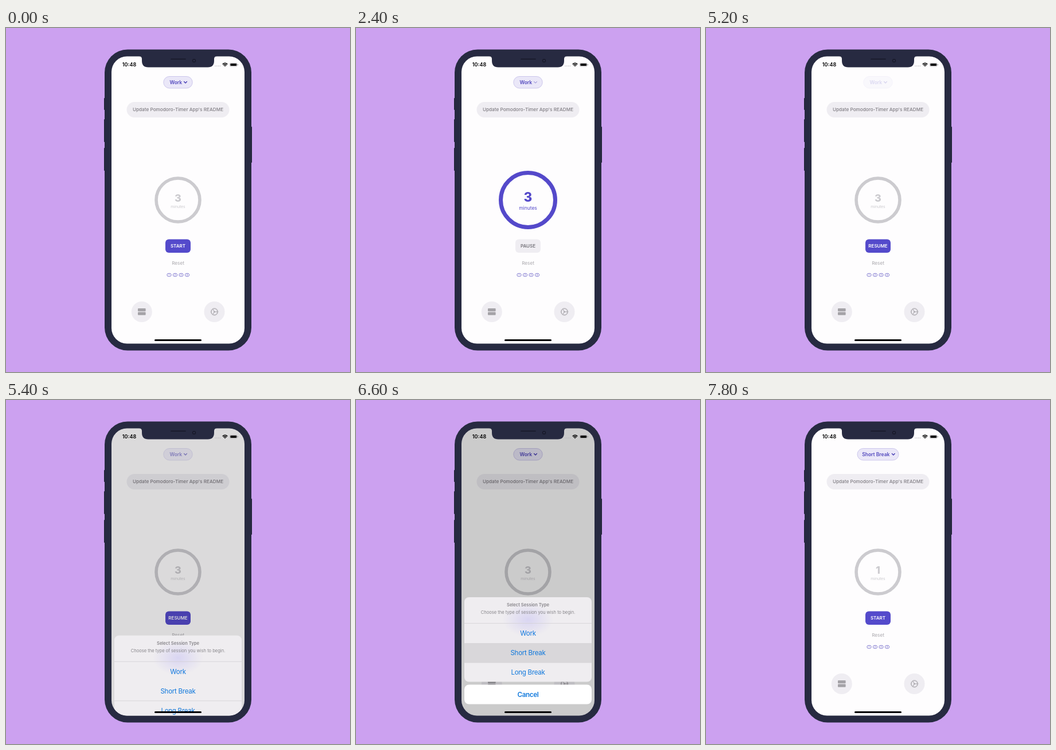
An HTML page that plays this animation: 600 px wide and 600 px high, repeating every 8 s.

```html
<!DOCTYPE html>
<html lang="en">
<head>
<meta charset="utf-8">
<title>Timer app</title>
<style>
  html, body { margin: 0; width: 100%; height: 100%; overflow: hidden; background: #cca1f0; }
  svg { display: block; width: 600px; height: 600px; font-family: Inter, sans-serif; text-anchor: middle; }
  .semi { font-weight: 600; }
  .actions text { font-size: 11.5px; letter-spacing: -.25px; fill: #0f78dc; }
</style>
</head>
<body>
<svg viewBox="0 0 600 600">
  <defs>
    <clipPath id="screen"><rect x="184" y="49.5" width="232" height="501" rx="27"/></clipPath>
    <radialGradient id="glow">
      <stop offset="0" stop-color="#d9d5f2"/>
      <stop offset="1" stop-color="#d9d5f2" stop-opacity="0"/>
    </radialGradient>
  </defs>

  <g fill="#1e2034">
    <rect x="171" y="122" width="4" height="21" rx="1"/>
    <rect x="171" y="159" width="4" height="40" rx="1"/>
    <rect x="171" y="209" width="4" height="40" rx="1"/>
    <rect x="425" y="172" width="4" height="63" rx="1"/>
  </g>
  <rect x="172" y="37.5" width="256" height="525" rx="40" fill="#272a41"/>

  <g clip-path="url(#screen)">
    <rect x="184" y="49" width="232" height="502" fill="#fefdfe"/>

    <g id="pill">
      <rect id="pillBox" y="84.5" height="20.5" rx="10.25" fill="#eae7f8" stroke="#c2bce8" stroke-width=".8"/>
      <text id="pillText" y="97.8" font-size="8.5" class="semi" fill="#5248be"></text>
      <path id="chevron" d="M-2.4-1.2 0 1.2 2.4-1.2" fill="none" stroke="#463cb4" stroke-width="1.4"
        stroke-linecap="round" stroke-linejoin="round"/>
    </g>

    <rect x="210.5" y="129" width="179" height="27" rx="13.5" fill="#efedf2"/>
    <text x="300" y="145.4" font-size="8.2" font-weight="500" fill="#807e84">Update Pomodoro-Timer App's README</text>

    <g id="dial" fill="currentColor">
      <circle r="47.5" fill="none" stroke="currentColor" stroke-width="7"/>
      <text id="minutes" y="3.3" font-size="22.5" font-weight="800"></text>
      <text y="17.3" font-size="8.5">minutes</text>
    </g>

    <g id="button">
      <rect id="buttonBox" x="278" y="368.5" width="44" height="23.5" rx="6"/>
      <text id="buttonText" x="300" y="383.2" font-size="8" class="semi"></text>
    </g>
    <text x="300" y="413.2" font-size="8.2" fill="#aaa8ad">Reset</text>
    <g id="rounds" fill="#6d63c8" stroke="#7269ca"></g>

    <g fill="#efedf2"><circle cx="236.8" cy="495" r="18"/><circle cx="363.5" cy="495" r="18"/></g>
    <g fill="#a4a2a7">
      <rect x="230" y="489" width="13.6" height="5.3" rx="1"/>
      <rect x="230" y="495.5" width="13.6" height="5.3" rx="1"/>
    </g>
    <g transform="translate(363.5 495)" fill="none" stroke="#a4a2a7">
      <circle r="5.4"/>
      <circle r="6.3" stroke-dasharray="1.2 1.28"/>
      <path d="M5.2 0H0L-2.6-4.5M0 0-2.6 4.5"/>
      <circle r="1.2" fill="#a4a2a7" stroke="none"/>
    </g>

    <rect id="dim" x="184" y="49" width="232" height="502"/>

    <g id="sheet">
      <rect x="189" y="344" width="222" height="147.5" rx="8" fill="#efedf0"/>
      <ellipse cx="300" cy="383" rx="44" ry="30" fill="url(#glow)"/>
      <rect id="highlight" x="189" y="424" width="222" height="34" fill="#d9d7da"/>
      <path d="M189 389.5H411M189 458H411" stroke="#d3d1d5" stroke-width=".8"/>
      <g fill="#87858a">
        <text x="300" y="360" font-size="7.6" class="semi">Select Session Type</text>
        <text x="300" y="373" font-size="7.55">Choose the type of session you wish to begin.</text>
      </g>
      <rect x="189" y="496.5" width="222" height="34" rx="8" fill="#fff"/>
      <g class="actions">
        <text x="300" y="411.2">Work</text>
        <text x="300" y="445.2">Short Break</text>
        <text x="300" y="479.2">Long Break</text>
        <text x="300" y="517.7" class="semi">Cancel</text>
      </g>
    </g>

    <text x="215" y="67.3" font-size="9" class="semi">10:48</text>
    <path d="M365 66.2H374" stroke="#b5b3b7" stroke-width="1.5" stroke-linecap="round" stroke-dasharray="0 2.8"/>
    <g fill="none" stroke="#000" stroke-width="1.4">
      <path d="M377.6 63.2Q382 59.2 386.4 63.2M379.2 65Q382 62.5 384.8 65"/>
      <path d="M380.6 65.8 382 67.5 383.4 65.8Q382 64.8 380.6 65.8" fill="#000" stroke="none"/>
    </g>
    <rect x="390.5" y="61" width="12.6" height="6" rx="1.8" fill="none" stroke="#a5a3a7" stroke-width=".7"/>
    <rect x="391.4" y="61.9" width="10.8" height="4.2" rx="1"/>
    <path d="M404.2 63V65.2" stroke="#8a888c"/>
    <rect x="259" y="543" width="82" height="3" rx="1.5"/>
  </g>

  <path d="M232 49Q237 49.5 237 54V57Q237 68.5 248 68.5H352Q363 68.5 363 57V54Q363 49.5 368 49Z" fill="#272a41"/>
  <path d="M288 54.3H313" stroke="#171929" stroke-width="1.6" stroke-linecap="round"/>
  <circle cx="328" cy="57" r="3.2" fill="#1a1c2d"/>
  <circle cx="328" cy="57" r="1.3" fill="#30334f"/>
</svg>
<script>
const LOOP = 8000;
const START = 1250, PAUSE = 3250, OPEN = 5305, DISMISS = 6680, PICKED = 7120;
const $ = id => document.getElementById(id);
const set = (id, attrs) => {
  for (const name in attrs) $(id).setAttribute(name, attrs[name]);
};
const clamp = x => Math.min(1, Math.max(0, x));
const ease = x => x < .5 ? 2 * x * x : 1 - 2 * (1 - x) ** 2;
const mix = (a, b, k) => `rgb(${a.map((v, i) => v + (b[i] - v) * k)})`;

// Critically damped spring from 0 to 1; rate is per second.
function spring(t, start, rate) {
  const x = Math.max(0, t - start) / 1000 * rate;
  return 1 - (1 + x) * Math.exp(-x);
}

// Opacity of a control that fades while held and recovers on release.
const touch = (t, down, up) =>
  1 - .8 * ease(clamp((t - down) / 150)) * (1 - ease(clamp((t - up) / 250)));

$('rounds').innerHTML = [1, 2, 3, 4].map((n, i) => {
  const x = 284.5 + i * 10.5;
  return `<ellipse cx="${x}" cy="430.7" rx="3.7" ry="2.7" fill="none" stroke-width=".9"/>
    <text x="${x}" y="432.1" font-size="3.8" stroke="none">${n}</text>`;
}).join('');

function draw(t) {
  const running = t >= START && t < PAUSE;
  const picked = t >= PICKED;
  const active = spring(t, START, 14) - spring(t, PAUSE, 14);
  const shown = spring(t, OPEN, 24.3) - spring(t, DISMISS, 18);

  const half = picked ? 36 : 25.2;
  set('pillBox', { x: 300 - half, width: 2 * half });
  $('pillText').textContent = picked ? 'Short Break' : 'Work';
  set('pillText', { x: 296.3 });
  set('chevron', {
    transform: `translate(${picked ? 326.8 : 313} 94.8)`,
    opacity: 1 - .5 * active, 'stroke-width': 1.4 - .4 * active
  });
  set('pill', { opacity: touch(t, 4950, 5275) });

  set('dial', {
    transform: `translate(300 300) scale(${.8 + .2 * active})`,
    color: mix([204, 203, 207], [84, 73, 202], active)
  });
  $('minutes').textContent = picked ? 1 : 3;

  $('buttonText').textContent =
    running ? 'PAUSE' : t >= PAUSE && !picked ? 'RESUME' : 'START';
  set('buttonText', { fill: running ? '#77757c' : '#fff' });
  set('buttonBox', { fill: running ? '#efedf2' : '#544acb' });
  set('button', { opacity: touch(t, 950, START) * touch(t, 2950, PAUSE) });

  set('dim', { opacity: .2 * shown });
  set('sheet', { transform: `translate(0 ${206.5 * (1 - shown)})` });
  set('highlight', { opacity: t >= 6350 ? 1 : 0 });
}

function frame() {
  draw(performance.now() % LOOP);
  requestAnimationFrame(frame);
}
frame();
</script>
</body>
</html>
```
